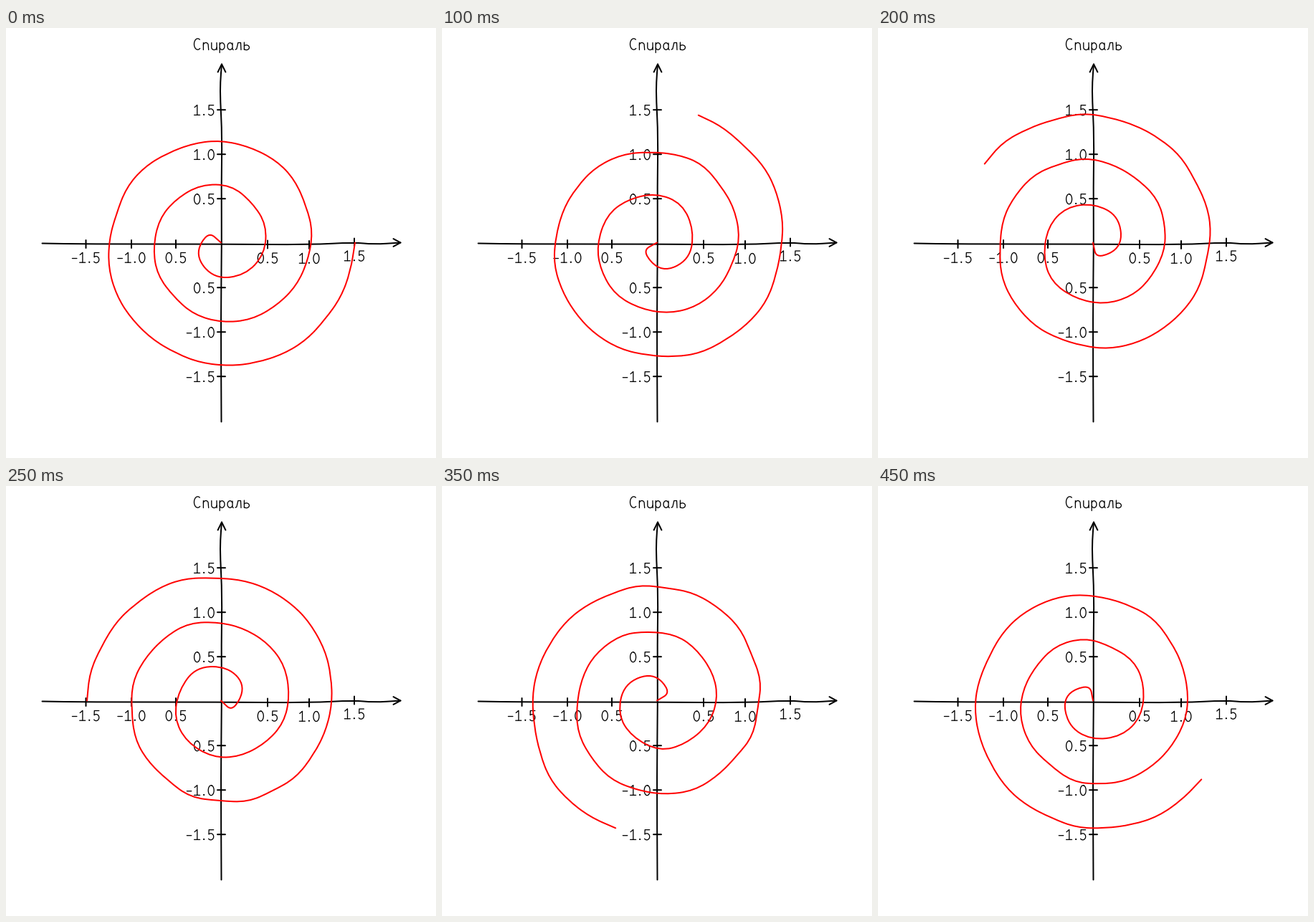
These frames come from a looping animation (600x600 px, 500 ms). A matplotlib script:

```python
import numpy as np
import matplotlib.pyplot as plt
from matplotlib.animation import FuncAnimation
from matplotlib.patches import PathPatch
from matplotlib.path import Path

SIZE, DPI = 600, 100
FRAMES, INTERVAL = 10, 50
CENTER = np.array([299.5, 299.0])
TURN = 62.33            # radius gained per full turn, px
TURNS, SEGMENTS = 3, 46
JITTER = 2.8
PEN, AXIS_PEN = 1.3, 2

fig = plt.figure(figsize=(SIZE / DPI, SIZE / DPI), dpi=DPI, facecolor="white")
ax = fig.add_axes([0, 0, 1, 1])
ax.set_xlim(-0.5, SIZE - 0.5)
ax.set_ylim(SIZE - 0.5, -0.5)
ax.axis("off")


def smooth(points):
    """Path along a polyline whose corners are rounded between midpoints."""
    p = np.asarray(points, float)
    mids = (p[:-1] + p[1:]) / 2
    verts, codes = [p[0], mids[0]], [Path.MOVETO, Path.LINETO]
    for corner, mid in zip(p[1:-1], mids[1:]):
        verts += [corner, mid]
        codes += [Path.CURVE3] * 2
    return Path(verts + [p[-1]], codes + [Path.LINETO])


def stroke(path, width, color="black", z=1):
    patch = PathPatch(path, fill=False, edgecolor=color, zorder=z, snap=False,
                      linewidth=width * 72 / DPI, capstyle="round",
                      joinstyle="round")
    return ax.add_patch(patch)


def arc(x, y, rx, ry, start, end):
    t = np.radians(np.linspace(start, end, 30))
    return list(zip(x + rx * np.cos(t), y + ry * np.sin(t)))


# Handwritten glyphs: strokes with y pointing up from the baseline
GLYPHS = {
    "-": [[(0.5, 6), (7, 6)]],
    ".": [arc(4.7, 0.8, 0.4, 0.4, 0, 360)],
    "0": [arc(5, 7, 4, 7, 80, 440)],
    "1": [[(1.5, 11), (5.2, 14.2), (5.2, 0.3)], [(1, 0.3), (9, 0.3)]],
    "5": [[(8.5, 14), (2, 14), (1.8, 8)], arc(4.5, 4.4, 4, 4.5, 130, -140)],
    "С": [arc(5.5, 8, 5, 7.7, 55, 310)],
    "п": [[(2, 10), (2, 0)], arc(5.4, 6.5, 3.4, 3.5, 180, 0) + [(9.3, 0)]],
    "и": [[(2, 10)] + arc(5.6, 3.5, 3.6, 3.5, 180, 360), [(9.2, 10), (9.4, 0)]],
    "р": [[(2, 10), (2, -4)], arc(5.2, 5, 3.6, 4.8, 150, -150)],
    "а": [arc(5, 5, 3.6, 4.8, 30, 330), [(8.4, 9.5), (8.4, 1), (9.6, 0)]],
    "л": [[(1, 0.5), (2.8, 1.2), (4.8, 10), (8.5, 10), (9, 0)]],
    "ь": [[(2, 10.5), (2, 0.3)], arc(5, 3.3, 4, 3.4, 140, -140)],
}


def write(text, x, baseline, advance=9.8):
    for i, char in enumerate(text):
        for line in GLYPHS[char]:
            stroke(Path([(x + i * advance + u, baseline - v) for u, v in line]),
                   PEN)


write("Спираль", 261.5, 30, 11.4)

# Axes with slightly wavering lines and open arrowheads
x_axis = np.array([(50, 300), (110, 301), (300, 301), (425, 302),
                   (485, 298.5), (512, 301.5), (550, 299)])
y_axis = np.array([(300, 549), (299.3, 400), (300.5, 300), (300, 220),
                   (301, 150), (298.5, 100), (298.5, 75), (300.5, 50)])
for line, back in ((x_axis, (-10, 0)), (y_axis, (0, 11))):
    stroke(smooth(line), AXIS_PEN)
    tip, back = line[-1], np.array(back)
    side = np.array([0, 5.4]) if back[0] else np.array([5.4, 0])
    stroke(Path([tip + back - side, tip, tip + back + side]), AXIS_PEN)

VALUES = ["-1.5", "-1.0", "0.5", "0.5", "1.0", "1.5"]
X_TICKS = [111, 174.5, 236.5, 364.5, 422.5, 485.5]
for text, value, x in zip(VALUES, (-1.5, -1, -0.5, 0.5, 1, 1.5), X_TICKS):
    level = np.interp(x, *x_axis.T)
    stroke(Path([(x, level - 5.5), (x, level + 5.5)]), AXIS_PEN)
    write(text, x - 4.9 * len(text), level + 26)

    y = 299.7 - 124 * value
    stroke(Path([(294.5, y), (305.5, y)]), AXIS_PEN)
    write(text, 290.5 - 9.8 * len(text), y + 7.5)

# Spiral corners spaced evenly along its length
theta = np.linspace(0, 2 * np.pi * TURNS, 4000)
arc_length = TURN / (4 * np.pi) * (theta * np.hypot(1, theta)
                                   + np.arcsinh(theta))
step = arc_length[-1] / SEGMENTS
angles = np.interp(np.arange(SEGMENTS + 1) * step, arc_length, theta)
radii = TURN * angles / (2 * np.pi)
# wobble grows from nothing at the centre and leaves the outer end in place
wobble = JITTER * np.minimum(1, radii / 60)
wobble[-1] = 0
# push corners outwards so that the rounded line keeps the true radius
radii[2:-1] += step ** 2 / (8 * radii[2:-1])

spiral = stroke(smooth([CENTER, CENTER + 1]), 2, "red", 3)


def draw(frame):
    turned = angles + 2 * np.pi * frame / FRAMES
    points = CENTER + np.column_stack([radii * np.cos(turned),
                                       -radii * np.sin(turned)])
    rng = np.random.default_rng(frame + 20)
    points += wobble[:, None] * rng.uniform(-1, 1, points.shape)
    spiral.set_path(smooth(points))
    return [spiral]


anim = FuncAnimation(fig, draw, frames=FRAMES, interval=INTERVAL,
                     repeat=True, repeat_delay=0, blit=False)
plt.show()
```
